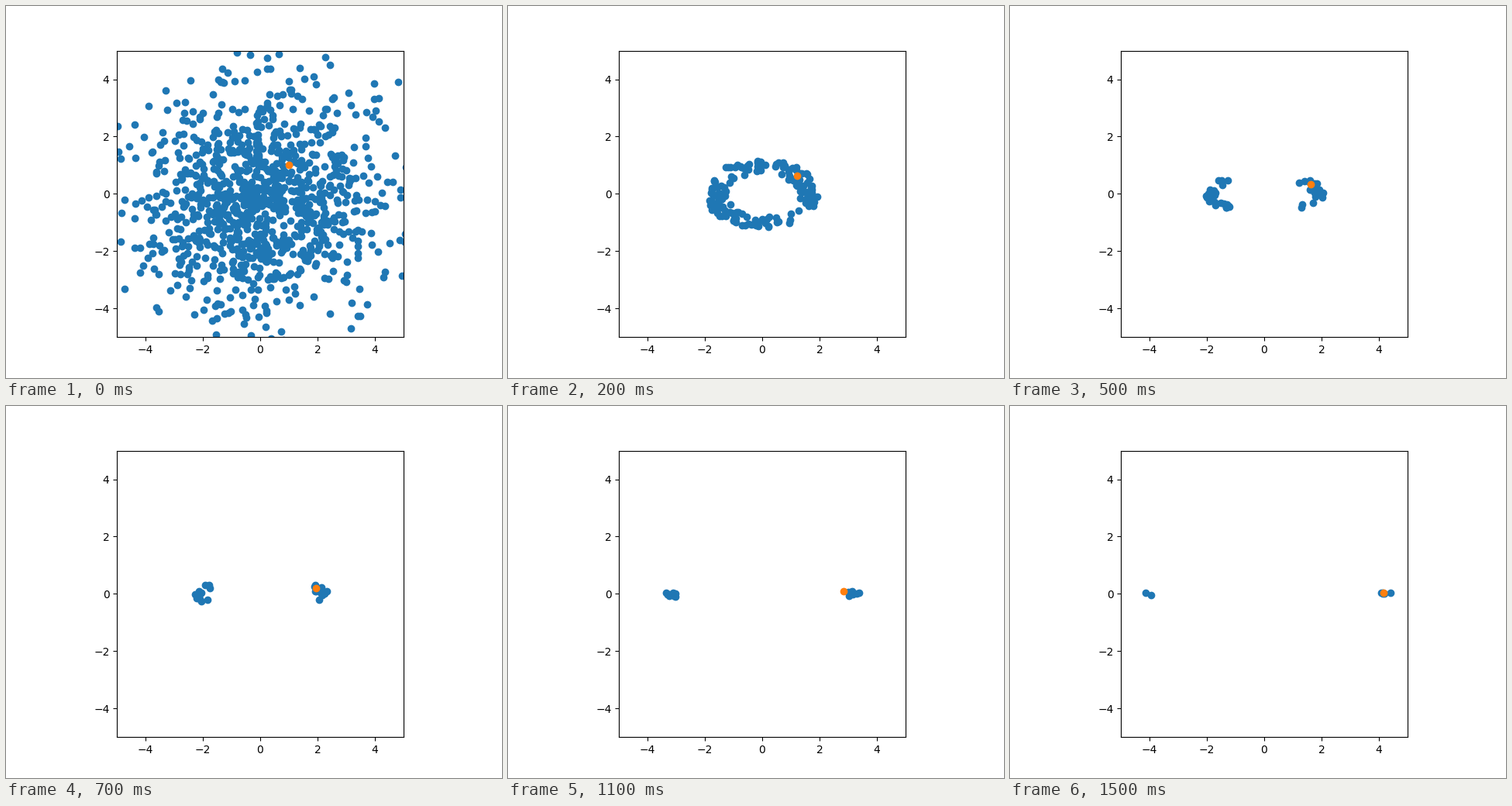
These frames come from a looping animation (640x480 px, 1.6 s). A matplotlib script:

```python
import numpy as np
import matplotlib.pyplot as plt
from matplotlib.animation import FuncAnimation

STEPS = 16
COUNT = 1000
LIMIT = 0.25
GROWTH = np.array([1.1, 0.8])

rng = np.random.default_rng(7)
start = rng.normal(0, [2.15, 1.95], (COUNT, 2))
tolerance = LIMIT * rng.uniform(0.5, 1, COUNT)


def moved(points, n):
    return points * GROWTH**n


def distance(points):
    return np.hypot(points[..., 0], points[..., 1])


def measured(k):
    """Distance of the true point from the centre, with a slowly drifting error."""
    error = np.interp(k, [5, 8, 10, 12], [0, 0.14, 0.14, -0.09])
    return distance(moved(np.ones(2), k)) * (1 + error)


def particles(n):
    """Particles whose distances still agree with the first n measurements."""
    misfit = np.zeros(COUNT)
    for k in range(n):
        misfit += (distance(moved(start, k)) - measured(k))**2
    kept = misfit - misfit.min() < tolerance
    return moved(start[kept], n)


fig, ax = plt.subplots(figsize=(6.4, 4.8), dpi=100)
ax.set_aspect("equal")
ax.set(xlim=(-5, 5), ylim=(-5, 5))
ticks = range(-4, 5, 2)
ax.set_xticks(ticks)
ax.set_yticks(ticks)
dots, = ax.plot([], [], "o", color="C0")
truth, = ax.plot([], [], "o", color="C1")


def draw(n):
    dots.set_data(*particles(n).T)
    x, y = moved(np.ones(2), n)
    truth.set_data([x], [y])
    return dots, truth


anim = FuncAnimation(fig, draw, frames=STEPS, interval=100, repeat=True)
plt.show()
```
